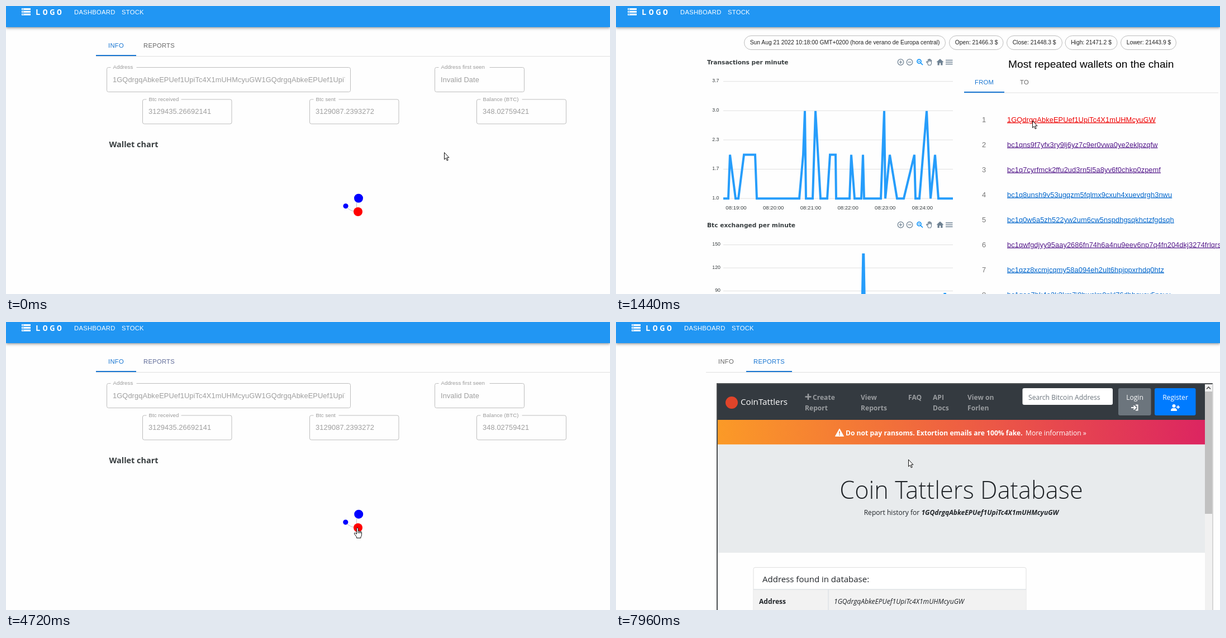
Animation, 1081 px wide and 518 px high, one loop 8000 ms. Source, as an HTML page:

```html
<!DOCTYPE html>
<html lang="en">
<head>
<meta charset="utf-8">
<title>Wallet explorer</title>
<style>
html, body { margin: 0; width: 100%; height: 100%; overflow: hidden; background: #fefefe; }
#stage { position: relative; width: 1081px; height: 518px; overflow: hidden; }
#bar { position: absolute; left: 0; top: -20px; width: 1081px; height: 58px; background: #2196f3;
  box-shadow: 0 2px 3px -1px rgba(0,0,0,.2), 0 3px 4px rgba(0,0,0,.14), 0 1px 8px rgba(0,0,0,.12); }
svg { position: absolute; left: 0; top: 0; }
text { font-family: "Liberation Sans", Arial, sans-serif; white-space: pre; }
.tab { font-size: 11.2px; letter-spacing: .3px; fill: #666; }
.tab.on { fill: #1976d2; }
.menu { fill: #fff; }
.brand { font: 700 14.5px "Noto Sans Mono", monospace; letter-spacing: 4px; fill: #fff; }
.label { font-size: 9.6px; letter-spacing: .09px; fill: #9a9a9a; }
.value { font-size: 12.8px; letter-spacing: .12px; fill: #9e9e9e; }
.box { fill: none; stroke: #bdbdbd; }
.title { font: 700 10.65px "DejaVu Sans", sans-serif; fill: #373d3f; }
.chip { font-size: 10.3px; fill: #222; }
.y { font-size: 8.8px; text-anchor: end; fill: #373d3f; }
.x { font-size: 9.6px; text-anchor: middle; fill: #373d3f; }
.grid { stroke: #e0e0e0; }
.line { fill: none; stroke: #269dfb; stroke-width: 4; }
.num { font-size: 12.8px; fill: #757575; text-anchor: middle; }
.link { font-size: 12.8px; letter-spacing: .1px; text-decoration: underline; fill: #06c; }
.link.seen { fill: #551a8b; }
.link.hit { fill: #e00; }
.web text { font-family: "Open Sans", "Noto Sans", sans-serif; font-size: 12.1px; fill: #212529; }
.web .nav { font-weight: 700; fill: #999c9f; }
.web .light { fill: #fff; }
.mid { text-anchor: middle; }
.bold { font-weight: 700; }
.it { font-style: italic; }
</style>
</head>
<body>
<div id="stage"><div id="bar"></div>
<svg id="art" width="1081" height="518" viewBox="0 0 1081 518"></svg></div>
<script>
const WALLET = "1GQdrgqAbkeEPUef1UpiTc4X1mUHMcyuGW";
const text = (x, y, cls, s, extra = "") => `<text x="${x}" y="${y}" class="${cls}" ${extra}>${s}</text>`;
const rect = (x, y, w, h, fill, extra = "") => `<rect x="${x}" y="${y}" width="${w}" height="${h}" fill="${fill}" ${extra}/>`;
const hline = (x1, x2, y) => `<path class="grid" d="M${x1} ${y}H${x2}"/>`;
const many = (list, fn) => list.map(fn).join("");

function header() {
  const rows = many([4, 8.8, 13.6], y => rect(28, y, 16, 3.2, "#fff") + rect(29.6, y + .8, 1.6, 1.6, "#2196f3"));
  return `<g id="head">${rows}${text(53, 16, "brand", "LOGO")}
    ${text(122, 14.5, "tab menu", "DASHBOARD", 'style="fill:#fff"')}${text(207, 14.5, "tab menu", "STOCK", 'style="fill:#fff"')}</g>`;
}

// outlined input whose top border is cut by its label
function field(x, y, w, label, gap, value, clip = "") {
  const r = x + w, b = y + 44;
  return `<path class="box" d="M${x + 7} ${y}H${x + 3}Q${x} ${y} ${x} ${y + 3}V${b - 3}Q${x} ${b} ${x + 3} ${b}H${r - 3}Q${r} ${b} ${r} ${b - 3}V${y + 3}Q${r} ${y} ${r - 3} ${y}H${x + gap}"/>`
    + text(x + 11, y + 2.8, "label", label) + text(x + 10.5, y + 26, "value", value, clip);
}

function infoPage() {
  return `<g id="info">
    <clipPath id="cut"><rect x="190" y="115" width="416.500" height="35"/></clipPath>
    ${field(180.5, 110.5, 436, "Address", 53, WALLET + WALLET, 'clip-path="url(#cut)"')}
    ${field(767.5, 110.5, 160, "Address first seen", 98, "Invalid Date")}
    ${field(244.5, 168, 159.5, "Btc received", 69, "3129435.26692141")}
    ${field(543.5, 168, 159.5, "Btc sent", 52, "3129087.2393272")}
    ${field(842.5, 168, 160, "Balance (BTC)", 81, "348.02759421")}
    <g id="graph">
      ${text(184.5, 254, "", "Wallet chart", 'style="font:700 14.4px \'Open Sans\',\'Noto Sans\',sans-serif" fill="#373d3f"')}
      <path id="edges" fill="none" stroke="#c4c4c4"/>
      <g id="nodes"><circle r="8" fill="#00f"/><circle r="8" fill="#f00"/><circle r="4.600" fill="#00f"/></g>
    </g></g>`;
}

function tabs() {
  return `<g id="tabs">${hline(161, 1081, 90.5)}<rect id="mark" y="88" height="2" fill="#1976d2"/>
    ${text(183, 75, "tab", "INFO", 'id="tabInfo"')}${text(246, 75, "tab", "REPORTS", 'id="tabReports"')}</g>`;
}

function toolbar(y) {
  return `<g transform="translate(0 ${y})" fill="none" stroke="#6e8192" stroke-width="1.200">
    <circle cx="509.500" r="5.300"/><path d="M506.500 0h6M509.500 -3v6"/>
    <circle cx="525.500" r="5.300"/><path d="M522.500 0h6"/>
    <g stroke="#008ffb" stroke-width="1.600"><circle cx="542.500" cy="-1.500" r="3.500"/><path d="M545 1l4 4M541 -1.500h3"/></g>
    <path d="M558 3l-2.500-3.500 1-.8 2 1.500v-4.500h1.500v3v-4h1.500v4v-3.500h1.500v4v-2.500h1.500v6l-1.500 2.800h-4z"/>
    <path fill="#6e8192" stroke="none" d="M580 -6l6.500 6h-2v5.500h-3.300v-4h-2.400v4h-3.300v-5.500h-2z"/>
    <path stroke-width="1.500" d="M590 -3.500h12.500M590 0h12.500M590 3.500h12.500"/></g>`;
}

const chips = [
  [229.5, 360, "Sun Aug 21 2022 10:18:00 GMT+0200 (hora de verano de Europa central)"],
  [596.5, 96.5, "Open: 21466.3 $"], [699.5, 99, "Close: 21448.3 $"],
  [804, 93, "High: 21471.2 $"], [903.5, 99, "Lower: 21443.9 $"]];
const wallets = [WALLET, "bc1qns9f7yfx3ry9lj6yz7c9er0vwa0ye2eklpzqfw", "bc1q7cyrfmck2ffu2ud3rn5l5a8yv6f0chkp0zpemf",
  "bc1q8unsh9v53ugqzm5fqlmx9cxuh4xuevdrgh3nwu", "bc1q0w6a5zh522yw2um6cw5nspdhgsqkhctzfgdsqh",
  "bc1qwfgdjyy95aay2686fn74h6a4nu9eev6np7q4fn204dkj3274frlqrs0w7k2",
  "bc1qzz8xcmjcqmy58a094eh2ult6hpjppxrhdq0htz", "bc1qee7hk4e3k3km7j8hwslm0pkl76dhhgxey5nevu"];

function hoverInfo() {
  return `<g id="hover">
    <path d="M198 137H603" stroke="#b6b6b6" stroke-width="1.500"/>
    <path d="M166.500 127h31v6l5 4-5 4v6h-31z" fill="#eceff1" stroke="#90a4ae"/>
    ${text(182, 141, "x", "3.6", 'style="fill:#45606e"')}
    <g id="follow">
      <path d="M298.500 137V346" stroke="#b6b6b6" stroke-dasharray="3"/>
      <circle cx="261" cy="271" r="2.500" fill="#269dfb"/>
      <path d="M274.500 348h20l4-4 4 4h19.500v28h-47.500z" fill="#eceff1" fill-opacity=".93" stroke="#90a4ae"/>
      ${text(298, 365, "x", "21 Aug", 'style="fill:#56676f"')}
      <g opacity=".93">${rect(271.5, 228.5, 89, 50, "#fff", 'rx="4" stroke="#e3e3e3"')}
      ${rect(272, 229, 88, 22, "#eceff1")}<path d="M272 251.500h88" stroke="#ddd"/></g>
      ${text(316, 243, "x", "21 Aug")}<circle cx="284.500" cy="265" r="4.800" fill="#2196f3"/>
      ${text(297, 268.5, "x", 'Volume:', 'style="text-anchor:start"')}${text(339, 268.5, "x bold", "1.0", 'style="text-anchor:start"')}
    </g></g>`;
}

function dashboard() {
  const yTicks = ["3.7", "3.0", "2.3", "1.7", "1.0"];
  return `<g id="dash">
    ${many(chips, ([x, w, s]) => rect(x, 53.5, w, 25, "none", 'rx="12.5" stroke="#bdbdbd"') + text(x + 10.2, 69.3, "chip", s))}
    ${text(163, 105, "title", "Transactions per minute")}${toolbar(101)}
    ${many(yTicks, (s, i) => hline(192, 603, 135.7 + 52.6 * i) + text(184.5, 137.3 + 52.6 * i, "y", s))}
    ${many([19, 20, 21, 22, 23, 24], (m, i) => text(215 + 66.7 * i, 366.3, "x", `08:${m}:00`))}
    <path id="volume" class="line"/>
    ${text(163, 397.7, "title", "Btc exchanged per minute")}${toolbar(393.5)}
    ${many([150, 120, 90], (n, i) => hline(192, 603, 429.5 + 41.5 * i) + text(187, 431 + 41.7 * i, "y", n))}
    <path id="amount" class="line"/>
    ${hoverInfo()}
    ${text(702, 111, "", "Most repeated wallets on the chain", 'font-size="19.2"')}
    ${hline(623, 1078, 156)}${rect(623, 154, 72, 2, "#1976d2")}
    ${text(642, 140.5, "tab on", "FROM")}${text(723, 140.5, "tab", "TO")}
    ${many(wallets, (s, i) => text(658.5, 208.5 + 45 * i, "num", i + 1)
      + text(700, 208.5 + 45 * i, "link" + ([0, 1, 2, 5].includes(i) ? " seen" : ""), s, `id="w${i}"`))}
  </g>`;
}

function reportPage() {
  const nav = [[438, "View", "Reports"], [523, "FAQ", ""], [567, "API", "Docs"], [629, "View on", "Forlen"]];
  return `<g id="report">
    <path d="M181 518V111H1068" fill="none" stroke="#4a4d50" stroke-width="2"/><path d="M1068 111V518" stroke="#c8c8c8" stroke-width="1.500"/>
    <g id="web" class="web">
    <defs><linearGradient id="warm"><stop stop-color="#fb9a27"/><stop offset=".5" stop-color="#ee5f42"/><stop offset="1" stop-color="#dc2561"/></linearGradient></defs>
    ${rect(182, 112, 872, 64, "#343a40")}<circle cx="207" cy="145" r="11" fill="#e0442a"/>
    ${text(223, 149, "light", "CoinTattlers", 'style="font-size:15.2px"')}
    <path d="M338.500 134.500h11M344 129v11" stroke="#999c9f" stroke-width="2.500"/>
    ${text(352, 139.5, "nav", "Create")}${text(338, 159, "nav", "Report")}
    ${many(nav, ([x, a, b]) => text(x, 139.5, "nav", a) + text(x, 159, "nav", b))}
    ${rect(727.5, 119, 161.5, 30, "#fff", 'rx="3"')}${text(738, 139.5, "", "Search Bitcoin Address", 'style="fill:#6c757d"')}
    ${rect(899, 119, 58.5, 49, "#6c757d", 'rx="3"')}${text(928.5, 140, "light mid", "Login")}
    <path d="M922 154h7M926.500 150.500l3.500 3.500-3.500 3.500M930 149.500h3.500v9h-3.500" fill="none" stroke="#fff" stroke-width="2"/>
    ${rect(964, 119, 73.5, 49, "#007bff", 'rx="3"')}${text(1001, 140, "light mid", "Register")}
    <g fill="#fff"><circle cx="998.500" cy="151" r="3"/><path d="M993 160q0-5 4-5h3q4 0 4 5zM1003 152.300h6v1.700h-6zM1005.200 150h1.700v6h-1.700z"/></g>
    ${rect(182, 176, 872, 44.5, "url(#warm)")}
    <path d="M400 192l7.500 13.500h-15z" fill="#fff" stroke="#fff" stroke-linejoin="round"/><path d="M400 196.500v4.500M400 202.300v1.800" stroke="#f47a38" stroke-width="1.700"/>
    ${text(411, 203.5, "light bold", "Do not pay ransoms. Extortion emails are 100% fake.")}${text(733, 203.5, "light", "More information »")}
    ${rect(182, 220.5, 872, 194.5, "#e8ebed")}
    ${text(618, 318, "mid", "Coin Tattlers Database", 'style="font-size:43.3px;font-weight:300"')}
    ${text(618, 347, "mid", `Report history for <tspan class="bold it">${WALLET}</tspan>`)}
    ${rect(246, 441.5, 488, 100, "#fff", 'rx="3" stroke="#dfdfdf"')}${text(262, 468, "", "Address found in database:", 'style="font-size:15px"')}
    ${rect(246.5, 481, 487, 60, "#f2f2f2")}<path d="M246 481h488M380 481v40" stroke="#dee2e6" stroke-width="1.500"/>
    ${text(256, 507, "bold", "Address")}${text(390, 507, "it", WALLET)}
    ${rect(1054, 112, 13, 406, "#f1f1f1")}${rect(1054, 125, 13, 220, "#c1c1c1")}<path d="M1057 120.500l3.500-3.500 3.500 3.500" fill="none" stroke="#505050" stroke-width="1.600"/>
    </g></g>`;
}

function pointers() {
  return `<g id="pointer">
    <path id="arrow" d="M.5 .5V13L3.300 10.400 5.300 15 7.200 14.200 5.200 9.700H9z" fill="#fff" stroke="#111"/>
    <path id="cross" d="M-9.500 0h19M0 -9.500v19" stroke="#000" stroke-width="2"/>
    <path id="hand" d="M-1.500 10V1.500Q-1.500 .3 -.2 .3T1.200 1.500V6Q2.500 5 3.500 6.500 5 5.800 5.600 7.200 7.500 6.800 7.500 8.500V12.500Q7.500 15 6 16.500V18.500H-1.500V16.500L-5.500 11Q-6 9.300-4.300 9.300-3 9.500-1.500 11.500zM1.200 6v4M3.500 6.500v3.500M5.600 7.200V10" fill="#fff" stroke="#111"/></g>`;
}

document.getElementById("art").innerHTML = header() + tabs() + infoPage() + dashboard() + reportPage() + pointers();
const el = id => document.getElementById(id);
const show = (id, on) => el(id).style.display = on ? "" : "none";
const clamp = v => Math.max(0, Math.min(1, v));
const ease = v => (v = clamp(v)) * v * (3 - 2 * v);

// x positions where the volume reaches each level
const levels = {
  1: [192, 201, 214, 219, 252, 328, 340, 352, 366, 378, 394, 418, 427, 439, 444, 474, 482, 503, 515, 536, 543, 563, 577, 603],
  2: [204, 229, 249, 335, 383, 393, 421, 442, 490, 534, 571],
  3: [338, 357, 480, 556]
};
const volume = Object.entries(levels).flatMap(([v, xs]) => xs.map(x => [x, v - 1])).sort((a, b) => a[0] - b[0]);

const path = [
  [0, 784, 263], [69, 784, 263], [70, 303, 110], [180, 303, 110], [410, 306, 158], [480, 308, 159], [850, 603, 185],
  [1150, 745, 206], [1750, 745, 206], [2540, 629, 199], [2900, 520, 255], [3300, 632, 338], [3450, 630, 346],
  [4140, 630, 352], [4500, 629, 370], [5850, 629, 370], [6250, 578, 254], [6660, 290, 70], [7000, 289, 69],
  [7480, 505, 228], [7620, 519, 243], [7890, 519, 243], [7950, 523, 247], [8000, 523, 247]];

function cursorAt(t) {
  const i = path.findIndex(k => k[0] > t), a = path[i - 1], b = path[i], p = ease((t - a[0]) / (b[0] - a[0]));
  return [a[1] + (b[1] - a[1]) * p, a[2] + (b[2] - a[2]) * p];
}

function drawCharts(t) {
  const k = 1 - ease((t - 410) / 210), base = 346.3 - 7 * k, unit = 78.7 + 7.3 * k;
  el("volume").setAttribute("d", "M" + volume.map(([x, v]) => `${x === 603 ? x + 2 * k : x} ${base - unit * v}`).join("L"));
  const top = 447 - 18 * k, side = 518 - 7 * k;
  el("amount").setAttribute("d", `M440.500 540L442.300 ${top}H443.300L445 540M587.500 540L588.300 ${side}H589L590 540`);
}

function drawGraph(t) {
  const fresh = t > 70 && t < 3400, drift = t < 70 ? .5 : clamp((t - 2540) / 3000);
  const spread = t < 70 ? 0 : 1 - ease((t - 1750) / 700);
  const pts = [[630.5 + drift, 346 - drift / 2 + 3 * spread], [630, 370 + 7 * spread], [608.5 - drift, 359.3 + drift + 2 * spread]];
  [...el("nodes").children].forEach((c, i) => {
    c.setAttribute("cx", pts[i][0]);
    c.setAttribute("cy", pts[i][1]);
    c.setAttribute("stroke", fresh ? "#222" : "none");
  });
  const [a, b, c] = pts;
  el("edges").setAttribute("d", `M${a}Q624 358 ${b}M${c}Q615 370 ${b}`);
}

function draw(t) {
  const dash = t >= 70 && t < 1540, report = t >= 6800, info = !dash && !report;
  const [x, y] = cursorAt(t);
  show("dash", dash); show("tabs", !dash); show("info", info); show("report", report);
  show("web", t >= 7890);
  show("graph", t < 70 || t >= 1780);
  el("head").setAttribute("transform", `translate(${dash ? -7 : 0} 0)`);

  const slide = ease((t - 6800) / 240);
  el("mark").setAttribute("x", 161 + 72 * slide);
  el("mark").setAttribute("width", 72 + 10 * slide);
  el("tabInfo").classList.toggle("on", info);
  el("tabReports").classList.toggle("on", report);
  el("tabReports").style.fill = info && t > 70 ? "#5f6b98" : "";

  if (dash) drawCharts(t);
  if (info) drawGraph(t);
  el("w0").classList.toggle("hit", t >= 1300);

  const onChart = dash && y > 130 && x < 603, hand = t > 3330 && t < 5880;
  show("hover", onChart && t > 330);
  el("follow").setAttribute("transform", `translate(${Math.max(0, x - 306)} 0)`);
  show("cross", onChart); show("hand", hand); show("arrow", !onChart && !hand);
  el("pointer").setAttribute("transform", `translate(${x} ${y})`);
}

const start = performance.now();
function tick() {
  draw((performance.now() - start) % 8000);
  requestAnimationFrame(tick);
}
tick();
</script>
</body>
</html>
```
